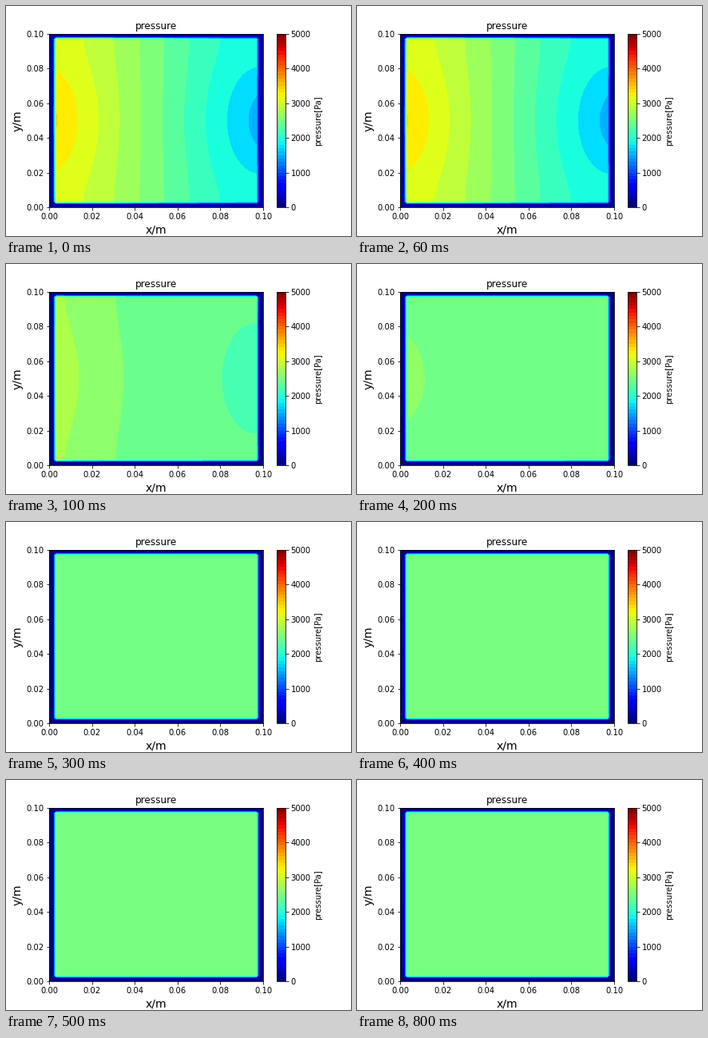
Recreate the animation shown at these times as a matplotlib script. Size 432x288 px, loop 1000 ms.

```python
import numpy as np
import matplotlib.pyplot as plt
from matplotlib.animation import FuncAnimation
from matplotlib.cm import ScalarMappable
from matplotlib.colors import Normalize

plt.rcParams.update({"font.family": "DejaVu Sans", "font.size": 10})

NODES, RING, TOP = 61, 2, 5000
LEVELS = np.arange(0, TOP + 1, 200)
s = np.linspace(0, 1, NODES)
S, T = np.meshgrid(s, s)


def decay(d):
    return np.exp(-2 * np.pi * d)


def pressure(base, slope, peak, left, right):
    """Sloping field with a bump at each side wall and an empty rim."""
    fall = np.cos(2 * np.pi * (T - 0.5)) - 1
    p = base - slope * S + peak * decay(S)
    p += fall * (left * decay(S) - right * decay(1 - S))
    rim = np.minimum(np.minimum(S, 1 - S), np.minimum(T, 1 - T))
    return np.where(rim < (RING - 0.5) / (NODES - 1), 0, p)


# Field settings and the lower end of the colour scale
STEPS = [
    ((3450, 1990, 25, 205, 250), 0),
    ((2668, 336, 420, 92, 49), 210),
    ((2598, 200, 49, 40, 0), 145),
    ((2500, 0, 0, 0, 0), 100),
    ((2500, 0, 0, 0, 0), 75),
]

fig = plt.figure(figsize=(6, 4), dpi=72, facecolor="white")
fig.subplots_adjust(left=0.1255, right=0.9005, bottom=0.125, top=0.88)
ax = fig.add_subplot()

fields = [ax.contourf(S * 0.1, T * 0.1, pressure(*args), LEVELS,
                      cmap="jet", vmin=low, vmax=TOP)
          for args, low in STEPS]

scale = ScalarMappable(Normalize(0, TOP), plt.get_cmap("jet", 50))
bar = fig.colorbar(scale, ax=ax, ticks=range(0, TOP + 1, 1000))
bar.set_label("pressure[Pa]", labelpad=4.5)

ax.set(xlim=(0, 0.1), ylim=(0, 0.1))
ax.set_title("pressure", fontsize=12)
ax.set_xlabel("x/m", fontsize=14)
ax.set_ylabel("y/m", fontsize=14)


def draw(n):
    now = min(n, len(fields) - 1)
    for i, field in enumerate(fields):
        field.set_visible(i == now)
    return fields


anim = FuncAnimation(fig, draw, frames=10, interval=100,
                     repeat=True, repeat_delay=0, blit=False)
plt.show()
```
